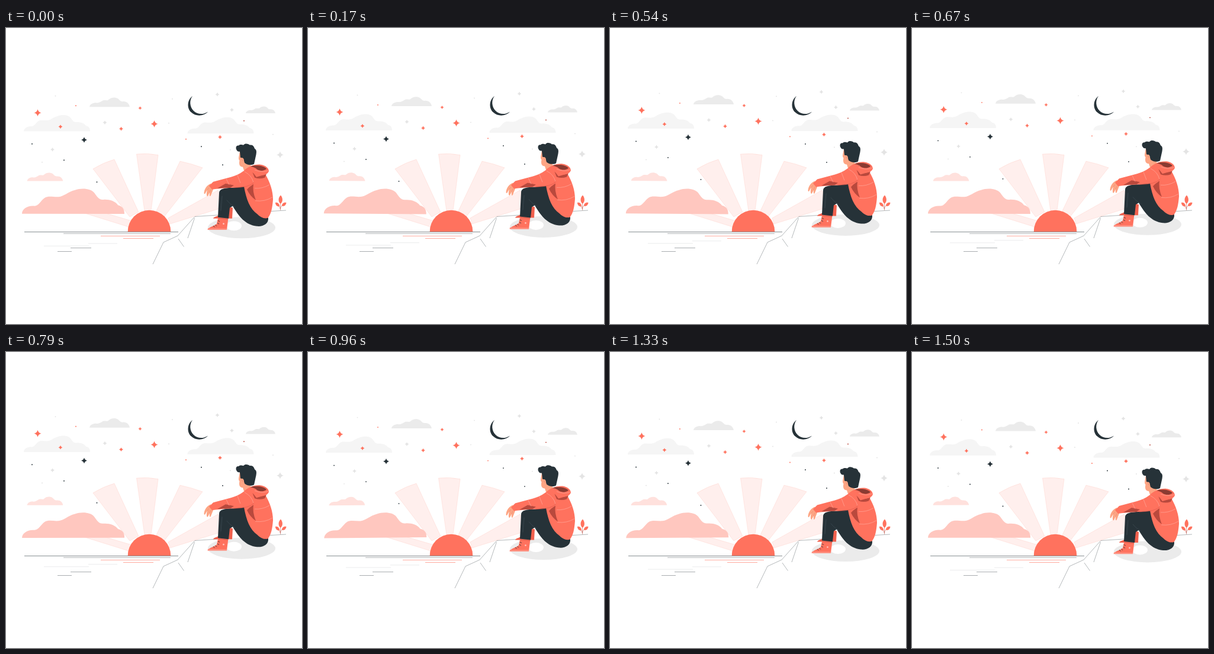
An HTML page with a canvas for the animation above (1.54 s loop, 500 by 500 pixels).

```html
<!DOCTYPE html>
<html lang="en">
<head>
<meta charset="utf-8">
<title>Sunset watcher</title>
<style>
  html, body { margin: 0; width: 100%; height: 100%; overflow: hidden; background: #fff; }
  canvas { display: block; width: 100vw; height: 100vh; }
</style>
</head>
<body>
<canvas id="stage" width="500" height="500"></canvas>
<script>
const ctx = document.getElementById('stage').getContext('2d');
const LOOP = 1540, LEAD = 30, RISE = 6.2, SWAY = 0.8 * Math.PI / 180;
const CORAL = '#ff725e', DARK = '#263238', SKIN = '#fda584', MAROON = '#b9493d',
  PINK = '#ffc7bf', PALE = '#ffe1dd', GREY = '#ebebeb', MIST = '#f5f5f5', SILVER = '#e4e4e4';

function fill(d, color) {
  ctx.fillStyle = color;
  ctx.fill(new Path2D(d));
}

function line(d, color = DARK, width = 0.6) {
  ctx.strokeStyle = color;
  ctx.lineWidth = width;
  ctx.stroke(new Path2D(d));
}

function oval(x, y, rx, ry, color, turn = 0) {
  ctx.fillStyle = color;
  ctx.beginPath();
  ctx.ellipse(x, y, rx, ry, turn, 0, 2 * Math.PI);
  ctx.fill();
}

function at(x, y, scale, draw) {
  ctx.save();
  ctx.translate(x, y);
  ctx.scale(scale, scale);
  draw();
  ctx.restore();
}

// Cloud outlines start at their lower left corner.
const WIDE = 'M0 0C0-5 6-9 13-8.5C18-8 20-14 25-17.5C29-20 35-18 40-18.5C46-19 50-24 58-26' +
  'C65-28.5 75-28 79-23C82-19 84-15 89-15.5C95-16 102-14 105-9.5C111-8 112-4 112 0Z';
const SMALL = 'M0 0C1-5 6-7 11-7C16-6 19-9 23-11C27-12 30-10 32-12C36-16 43-17 48-14' +
  'C51-12 52-9 56-9C62-10 67-6 68 0Z';
const cloud = (shape, x, y, scale, color) => at(x, y, scale, () => fill(shape, color));

const STARS = [
  [CORAL, 53.5, 143.5, 6], [CORAL, 250.5, 162.2, 6], [CORAL, 226.5, 135.5, 3],
  [CORAL, 194.5, 170.5, 3.4], [CORAL, 92, 167, 3.4], [CORAL, 361.5, 184.5, 3.4],
  [DARK, 132, 189.2, 5], [SILVER, 357, 112.5, 3.4], [SILVER, 381.5, 138.5, 3.4],
  [SILVER, 167, 160, 3.4], [SILVER, 78.5, 205.5, 3.4], [SILVER, 463, 214.5, 5.8]
];
const DOTS = [
  [CORAL, 118, 131.5], [CORAL, 304, 188], [MAROON, 402, 157], [DARK, 44, 196],
  [DARK, 98, 223.5], [DARK, 153.5, 260.5], [DARK, 330, 200.5], [DARK, 366, 231.5],
  [SILVER, 83.5, 115], [SILVER, 281, 120], [SILVER, 275, 161], [SILVER, 61, 227],
  [SILVER, 451, 180], [SILVER, 379, 206]
];

function sky() {
  cloud(WIDE, 30, 174.7, 1, MIST);
  cloud(WIDE, 306.5, 178.5, 1, MIST);
  cloud(SMALL, 141, 133.5, 1, GREY);
  cloud(SMALL, 405, 144.2, 0.735, GREY);
  for (const [color, x, y, r] of STARS) {
    at(x, y, r, () => fill('M0-1Q.2-.2 1 0Q.2.2 0 1Q-.2.2-1 0Q-.2-.2 0-1Z', color));
  }
  for (const [color, x, y] of DOTS) oval(x, y, 0.95, 0.95, color);
  line('M64 368.5H140M139 364.3H188', '#26323844', 0.35);
}

function scenery() {
  const rays = [
    'M130 312L152 308L213 326L207 336Z',
    'M147 238Q165 227 183 222L224 311L209 319Z',
    'M220.5 213Q239 211 257 214.5L245 309H234Z',
    'M294 225Q313 229 332 236L267 319L253 311Z',
    'M274 321L358 274L374 301L277 331Z'
  ];
  for (const ray of rays) {
    fill(ray, '#ffefed');
    line(ray, '#ff725e55', 0.4);
  }
  ctx.fillStyle = CORAL;
  ctx.beginPath();
  ctx.arc(242, 344, 36.3, Math.PI, 0);
  ctx.fill();

  line('M31 344.5H291', DARK, 0.55);
  line('M97 347.2H278M109 371.5H144M87 377.5H111', DARK, 0.4);
  line('M160 351.4H260M198 355.5H249', CORAL, 0.6);
  line('M248 399L266 362L290 351L319 318.5L358 316M440 310L473 308M318.5 321L307 355M291 356L300.5 369.5', DARK, 0.35);
  fill('M315 115C306 121 305 136 313 142.5C321 150 334 149 341 141.5' +
    'C333 147 323 146 317 140C310 133 309.5 122 315 115Z', DARK);

  line('M463.5 308V290M463.5 306Q463 301 458 298M463.5 306Q464 300 470 297', MAROON, 0.5);
  fill('M464 282.5C468 287 468 294 463.5 297C459 293 460 286 464 282.5Z', CORAL);
  fill('M455 295C459 294 462 297 462 301.5C458 302 455 299 455 295Z', CORAL);
  fill('M473.5 295C469 294 466 297 466 300.5C470 302 473 299 473.5 295Z', CORAL);
}

function sunsetClouds(angle) {
  ctx.save();
  ctx.translate(113, 279);
  ctx.rotate(angle);
  ctx.translate(-113, -279);
  cloud(SMALL, 35.5, 258.6, 0.895, PALE);
  cloud(WIDE, 27, 313.8, 1.545, PINK);
  ctx.restore();
}

function boots() {
  fill('M377 302L383 304L382 322H350C351 319 356 319 360 316L371 315Z', '#f0604d');
  fill('M358.5 319L375.5 321L373 341H341C342 336 352 335 356 331Z', CORAL);
  fill('M341 338.6L373 339V341.2H340.5Z', '#ff9080');
  line('M350 334.5L352.5 336.5M353.5 332.5L356 335M357 329.5L360 331.5M358 325.5L361 327', DARK, 0.8);
  oval(367.5, 331, 1.4, 1.4, '#ffc2b9');
  line('M359 321.5L375 323', '#c4503f', 0.7);
}

function trousers() {
  fill('M360 279C360 272 369 270 384 270L405 266L443 321C444 331 434 336 424 335' +
    'C404 333 393 318 383 301L378 304L376 322L358 320Z', DARK);
  line('M373 291C378 297 382 300 387 303M365 284L363 309', '#52616a', 0.4);
}

function jacket() {
  fill('M400 243L412 235L438 247C446 261 451 275 451 290C450 304 448 314 442.5 321' +
    'C436 323 430 320 425 315C412 306 406 290 402 268Z', CORAL);
  fill('M401 242C394 247 387 250 380 252L350 260L343 267L348 273C363 271 375 270 386 270' +
    'L407 268L419 261L417 245Z', CORAL);
  fill('M357 271L371 263L385 266L379 270Z', MAROON);
  fill('M411 269L418 264Q416 276 422 291Q412 284 407 273Z', MAROON);
  fill('M416 243L423 252L440 247L437 253Q428 256 420 253Z', MAROON);
  fill('M401 242C408 235 419 230 430 231C438 232 444 237 444 242' +
    'C442 248 434 250 426 249C419 247 414 242 409 239Z', CORAL);
  fill('M413 234C423 231 436 233 440 238C436 242 429 242 424 239C421 236 417 235 413 234Z', '#8a3b32');
  line('M420 240Q432 245 443 241M420 271Q433 272 445 265M421 292Q437 294 450 286' +
    'M372 255L377 265M391 249L396 262M403 243Q415 249 418 261', '#ffbcb2', 0.5);
  line('M384 270Q411 270 419 261', '#d9574a', 0.6);
}

function head() {
  fill('M395 207C395 214 391 221 394.5 224C393 231 395 235 400 235L402 241L414 235L407 210Z', SKIN);
  fill('M390 207C387 203 389 198 393 199C396 196 399 198 401 198C404 194 410 196 412 198' +
    'C417 197 419 201 420 204C424 206 423 211 422.5 214L419 230C413 233 406 231 403 228' +
    'L401 221L396 219L395 209C393 209 391 209 390 207Z', DARK);
  oval(399, 223, 2.7, 3.5, SKIN, -0.2);
  line('M398 221.5Q400 222 399.5 225', '#d27b68', 0.5);
}

function hand() {
  fill('M346 263C339 266 335 272 334.5 279C335 282 337 280 338 277L340 274' +
    'C338 280 339 286 341 284L344 278C343 284 345 286 346 283L350 273Z', SKIN);
  line('M340 274L343 270M344 278L346 273', '#e08570', 0.5);
}

function sitter() {
  oval(398, 337.5, 57, 18, GREY);
  oval(385, 334.5, 13, 8, '#fff');
  boots();
  trousers();
  hand();
  head();
  jacket();
}

function frame(now) {
  const phase = ((now + LEAD) % LOOP) / LOOP;
  const lift = RISE * (1 - Math.abs(2 * phase - 1));
  // Linear swing: up to +1 at a quarter, down to -1 at three quarters.
  const swing = 1 - Math.abs(((4 * phase + 1) % 4) - 2);

  ctx.fillStyle = '#fff';
  ctx.fillRect(0, 0, 500, 500);
  scenery();
  at(0, -lift, 1, sky);
  sunsetClouds(-SWAY * -swing);
  at(0, -lift, 1, sitter);
}

const start = performance.now();
function tick() {
  frame(performance.now() - start);
  requestAnimationFrame(tick);
}
tick();
</script>
</body>
</html>
```
